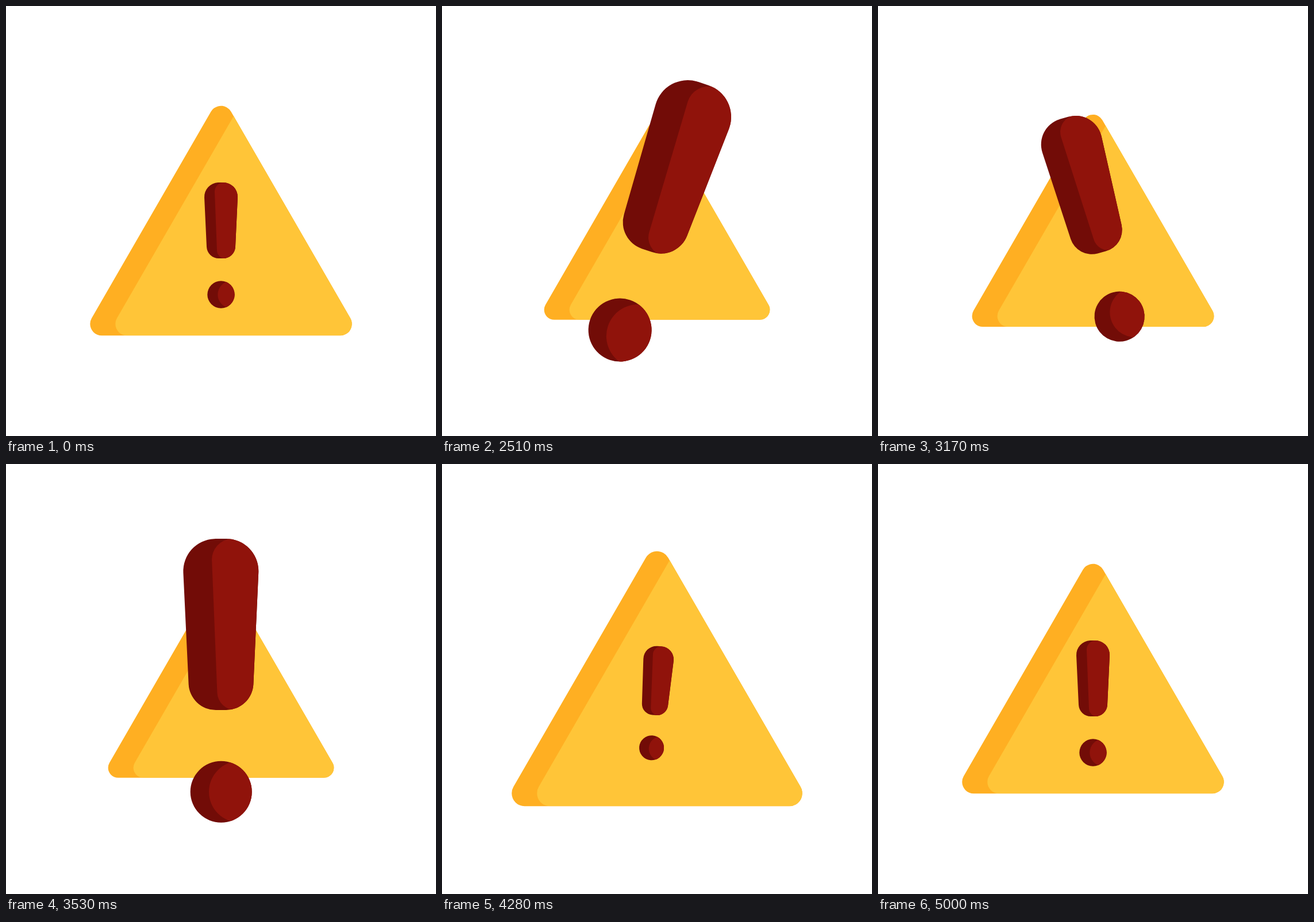
An HTML page with a canvas that plays this animation: 748x748 px, repeating every 5.06 s.

```html
<!DOCTYPE html>
<html lang="en">
<head>
<meta charset="utf-8">
<title>Warning sign</title>
<style>
html, body { margin: 0; width: 100%; height: 100%; overflow: hidden; background: #fff; }
canvas { display: block; width: 748px; height: 748px; }
</style>
</head>
<body>
<canvas id="stage" width="748" height="748"></canvas>
<script>
const ctx = document.getElementById('stage').getContext('2d');
const LOOP = 5060, START = 2030, STEP = 30, LAST = 99;
const RAD = Math.PI / 180;
const DARK_RED = '#720c07', RED = '#90130b';

const clamp = x => Math.min(1, Math.max(0, x));

// Progress from 0 to 1 between two steps: soft, and with a sharp middle
const ease = (n, from, to) => (1 - Math.cos(Math.PI * clamp((n - from) / (to - from)))) / 2;
function whip(n, from, to) {
  const p = clamp((n - from) / (to - from));
  return p < .5 ? 16 * p ** 5 : 1 - 16 * (1 - p) ** 5;
}

function signPath() {
  const path = new Path2D(), r = 20.2, side = 207.5, half = 179.6;
  path.arc(0, -half, r, 210 * RAD, 330 * RAD);
  path.arc(side, half, r, -30 * RAD, 90 * RAD);
  path.arc(-side, half, r, 90 * RAD, 210 * RAD);
  path.closePath();
  return path;
}

// Tapered bar with its own corner radii on the left side
function stemPath(leftTop, leftBottom) {
  const path = new Path2D(), top = -108.5, bottom = 23.5, tilt = 2.7 * RAD;
  path.arc(4, top + 25, 25, -90 * RAD, tilt);
  path.arc(4, bottom - 21, 21, tilt, 90 * RAD);
  path.arc(leftBottom - 25, bottom - leftBottom, leftBottom, 90 * RAD, 180 * RAD - tilt);
  path.arc(leftTop - 29, top + leftTop, leftTop, 180 * RAD - tilt, 270 * RAD);
  path.closePath();
  return path;
}

const sign = signPath();
const stem = stemPath(25, 21), stemLight = stemPath(16, 14);
const dot = new Path2D();
dot.arc(0, 86.5, 23.7, 0, 360 * RAD);

// Dark shape with a lighter one, moved right and cut to the shape
function shaded(path, lightPath, dark, light, shift) {
  ctx.save();
  ctx.fillStyle = dark;
  ctx.fill(path);
  ctx.clip(path);
  ctx.translate(shift, 0);
  ctx.fillStyle = light;
  ctx.fill(lightPath);
  ctx.restore();
}

// How far the mark is blown up: grow, dip, grow again, fall back, settle
const swell = n => ease(n, -1.5, 16) - .57 * ease(n, 16, 27) + .54 * ease(n, 27, 53)
  - 1.04 * ease(n, 53, 73) + .07 * ease(n, 73, LAST);

// How far the sign is pressed in; it springs out late and swings back
const press = n => ease(n, -1.5, 16.5) - .62 * ease(n, 16.5, 30.5) + .63 * ease(n, 30.5, 52)
  - 1.9 * ease(n, 57.7, 72.5) + 1.14 * ease(n, 72.5, 86) - .25 * ease(n, 86, LAST);

function draw(n) {
  ctx.setTransform(1, 0, 0, 1, 0, 0);
  ctx.fillStyle = '#fff';
  ctx.fillRect(0, 0, 748, 748);
  ctx.translate(374, 373.5);

  const size = 1 - .138 * press(n);
  ctx.save();
  ctx.scale(size, size);
  shaded(sign, sign, '#ffaf22', '#ffc538', 44 / size);
  ctx.restore();

  // One full turn forward, then a quicker one back
  const g = swell(n), s = 1 + 1.32 * g;
  ctx.rotate(360 * RAD * (whip(n, -2.6, 55.9) - whip(n, 54.3, 81.5)));
  ctx.translate(0, 42 * clamp(1 - g) ** 1.1);
  ctx.scale(s, s);
  shaded(stem, stemLight, DARK_RED, RED, 18 * s ** .25);
  shaded(dot, dot, DARK_RED, RED, 18 / s ** .28);
}

function frame() {
  const t = performance.now() % LOOP;
  draw(t < START ? -3 : Math.min(LAST, Math.floor((t - START) / STEP)));
  requestAnimationFrame(frame);
}
frame();
</script>
</body>
</html>
```
